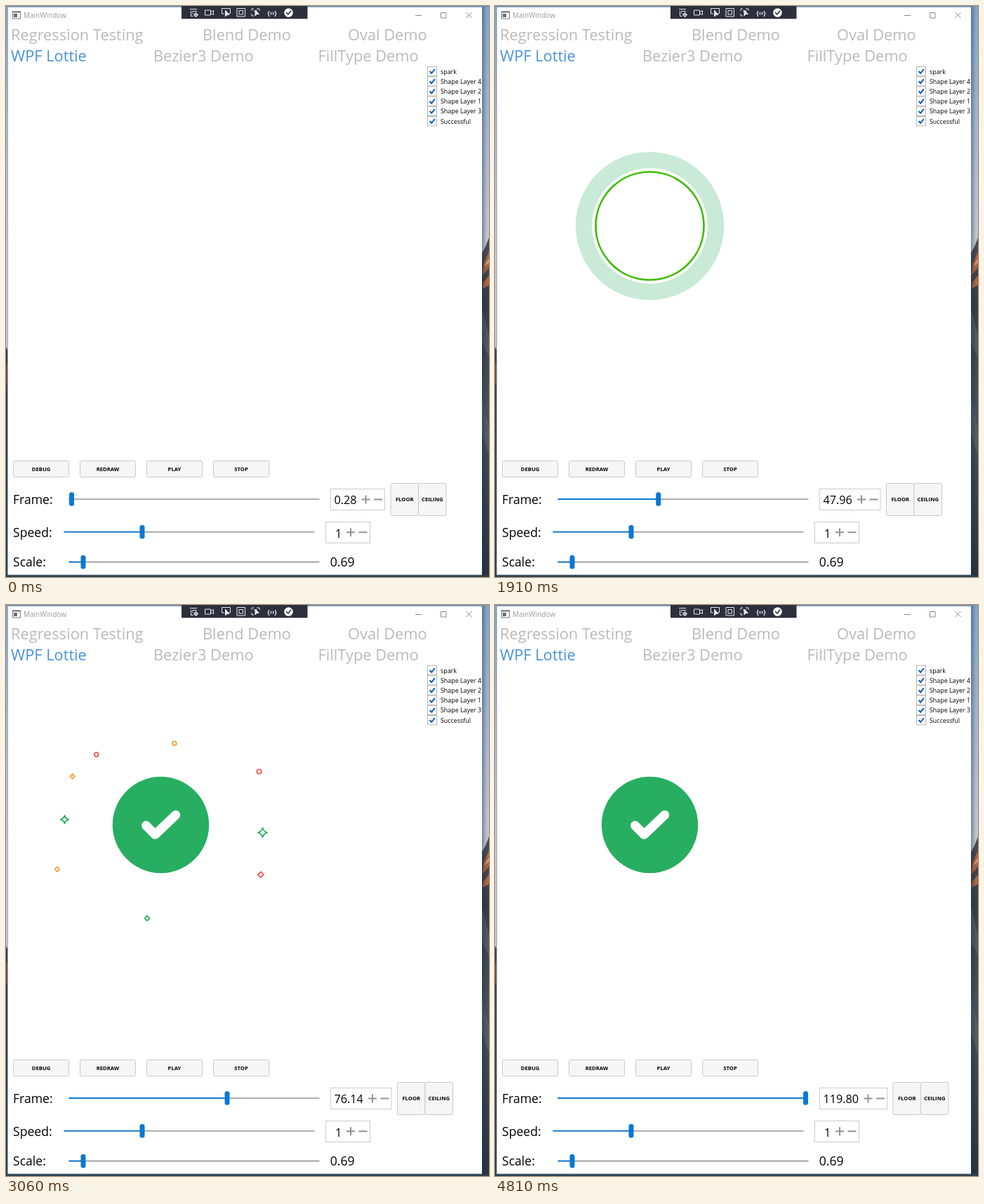
Animation of 688 by 814 pixels, one loop 4.84 s. Source, as an HTML page:

```html
<!DOCTYPE html>
<html lang="en">
<head>
<meta charset="utf-8">
<title>MainWindow</title>
<style>
html, body { margin: 0; width: 100%; height: 100%; overflow: hidden; background: #fff; }
svg { display: block; width: 688px; height: 814px; font-family: "Open Sans", "Noto Sans", sans-serif; }
.tab { font-size: 21.8px; fill: #bababa; }
.on { fill: #4792d8; }
.label { font-size: 17.6px; }
.num { font-size: 16.2px; }
.small { font-size: 8.9px; }
.btn { font-size: 7.7px; font-weight: 700; text-anchor: middle; }
.line { fill: none; stroke-linecap: round; stroke-linejoin: round; }
</style>
</head>
<body>
<svg id="stage" viewBox="0 0 688 814">
  <defs>
    <linearGradient id="sky" x1="0" y1="0" x2="0" y2="1">
      <stop offset="0" stop-color="#7fa6cd"/><stop offset=".2" stop-color="#a3b5cf"/>
      <stop offset=".42" stop-color="#c3c6d2"/><stop offset="1" stop-color="#c3c6d2"/>
    </linearGradient>
    <linearGradient id="rock" x1="0" y1="0" x2="0" y2="1">
      <stop offset="0" stop-color="#4d4b55"/><stop offset=".2" stop-color="#363c46"/>
      <stop offset=".5" stop-color="#43525c"/><stop offset="1" stop-color="#26343f"/>
    </linearGradient>
    <linearGradient id="shade">
      <stop offset="0" stop-color="#1b2c40" stop-opacity=".4"/><stop offset="1" stop-color="#1b2c40" stop-opacity="0"/>
    </linearGradient>
    <clipPath id="pane"><rect x="2" y="1" width="676" height="810"/></clipPath>
  </defs>
  <g id="desktop">
    <rect width="688" height="814" fill="url(#sky)"/>
    <path d="M688 330L683 343L678 352V814H688Z" fill="url(#rock)"/>
    <path d="M688 350L681 366L678 384L684 378L688 372ZM688 384L680 394L679 403L688 398Z" fill="#a9663f"/>
    <path d="M680 372L688 360V366Z" fill="#d39a72"/>
    <path d="M678 430L688 470V500L678 480ZM678 560L688 600V640L678 610Z" fill="#5b6870" opacity=".6"/>
    <path d="M0 486L2 490V814H0Z" fill="#38414a"/>
    <path d="M0 510H2V540H0Z" fill="#7a4b37"/>
    <rect y="811" width="688" height="3" fill="#2f414f"/>
    <rect x="678" width="7" height="814" fill="url(#shade)"/>
    <rect width="688" height="1" fill="#6f93b8"/>
  </g>
  <rect x="2" y="1" width="676" height="810" fill="#fff"/>
  <path d="M2 1.5H678M2.5 1V811M2 811H678" fill="none" stroke="#7c95ad" stroke-width=".8"/>
  <g id="chrome"></g>
  <g id="art">
    <circle id="ring" fill="none" stroke="#27ae60"/>
    <path id="arc" class="line" stroke="#3ebd00"/>
    <g id="sparks" class="line" stroke-width="2.7"></g>
    <g id="badge">
      <circle id="disc" r="68.7" fill="#27ae60"/>
      <path id="tick" class="line" d="M-21 .8L-8 13.8L21.3 -14.3" stroke="#fff" stroke-width="13"/>
    </g>
    <circle id="rim" r="77" fill="none" stroke="#3ebd00" stroke-width="2.7"/>
  </g>
  <g id="panel"></g>
</svg>
<script>
const $ = id => document.getElementById(id);
const set = (el, attrs) => { for (const k in attrs) el.setAttribute(k, attrs[k]); };
const clamp = x => Math.max(0, Math.min(1, x));
const mix = (a, b, p) => a + (b - a) * p;
const ramp = (x, a, b) => clamp((x - a) / (b - a));

// Rows are [position, value, value, ...]; returns the blended values.
function track(rows, x) {
  let i = 1;
  while (i < rows.length - 1 && x > rows[i][0]) i++;
  const a = rows[i - 1], b = rows[i], p = ramp(x, a[0], b[0]);
  return a.slice(1).map((n, k) => mix(n, b[k + 1], p));
}

const text = (x, y, cls, s, extra = "") => `<text x="${x}" y="${y}" class="${cls}" ${extra}>${s}</text>`;
const box = (x, y, w, h, fill, stroke, r = 0) =>
  `<rect x="${x}" y="${y}" width="${w}" height="${h}" rx="${r}" fill="${fill}" stroke="${stroke}"/>`;
const button = (x, y, w, h, s) => box(x, y, w, h, "#f6f6f6", "#c9c9c9", 2) +
  text(x + w / 2, y + h / 2 + 2.9, "btn", s);
const signs = (right, y) =>
  `<path d="M${right - 33.5} ${y}h12m-6 -6v12M${right - 16} ${y}h12" fill="none" stroke="#929292" stroke-width="2"/>`;
const slider = (x, y, at, id = "") => `
  <path d="M${x} ${y}h357" stroke="#969696" stroke-width="1.6"/>
  <path id="${id}fill" d="M${x} ${y}H${at}" stroke="#0a78d4" stroke-width="1.8"/>
  <rect id="${id}thumb" x="${at - 3.5}" y="${y - 9.7}" width="7" height="19.5" rx="3" fill="#0a78d4"/>`;

function buildChrome() {
  const tabs = [[7, 48.5, "Regression Testing"], [280, 48.5, "Blend Demo"], [487, 48.5, "Oval Demo"],
    [7, 78.5, "WPF Lottie"], [210, 78.5, "Bezier3 Demo"], [444.5, 78.5, "FillType Demo"]];
  const layers = ["spark", "Shape Layer 4", "Shape Layer 2", "Shape Layer 1", "Shape Layer 3", "Successful"];
  let s = text(25, 16.8, "", "MainWindow", 'font-size="10" fill="#999"');
  s += `<rect x="9.5" y="8" width="11" height="10" fill="#fff" stroke="#777"/>
    <path d="M9 8.5h12" stroke="#777" stroke-width="2"/><rect x="11" y="11" width="5" height="5" fill="#666d78"/>
    <path d="M583 13.5h9M619.5 9.5h7.5v7.5h-7.5zM655.5 9l8 8m0 -8l-8 8" fill="none" stroke="#888"/>
    <rect x="250" width="179.5" height="18.3" fill="#2c2f3c"/>
    <g fill="none" stroke="#e8e8ec">
      <path d="M262 4.5h10M263.5 7v7.5h3M265 7.5h7M265 10h2"/><circle cx="270.5" cy="12.5" r="2.4"/><path d="M270.5 9v7M267 12.5h7"/>
      <path d="M283.5 6h8v7h-8zM291.5 8.5l4 -2v6l-4 -2"/>
      <path d="M311 11h-3.5v-7.500h12v7h-2"/><path d="M312.500 6v9l2.500 -2.500h3z" fill="#e8e8ec"/>
      <path d="M329 3.500h11.500v11.500h-11.500zM332 6.500h5.500v5.500h-5.500z"/>
      <path d="M350 7v-3h3M357 4h4v3M350 11v3h3M353 7h5"/><path d="M355 6v8l2.500 -2.500h3z" fill="#e8e8ec"/>
    </g>
    <text x="379" y="13" font-size="9" font-weight="700" text-anchor="middle" fill="#f1f1f4">{‹›}</text>
    <circle cx="402.500" cy="9.500" r="6.300" fill="#fff"/>
    <path d="M399.500 9.500l2.300 2.500l4 -5" class="line" stroke="#2c2f3c" stroke-width="1.600"/>`;
  s += tabs.map(([x, y, n]) => text(x, y, n === "WPF Lottie" ? "tab on" : "tab", n)).join("");
  s += '<g clip-path="url(#pane)">' + layers.map((n, i) => {
    const y = 86.5 + 14.2 * i;
    return box(600.5, y, 13, 13.2, "#fff", "#b5b5b5") +
      `<path d="M603.500 ${y + 6.5}l2.700 3l4.600 -6" fill="none" stroke="#0b5cb8" stroke-width="2"/>` +
      text(619, y + 10, "small", n);
  }).join("") + "</g>";
  return s;
}

function buildPanel() {
  let s = ["DEBUG", "REDRAW", "PLAY", "STOP"].map((n, i) => button(10.5 + 95 * i, 648.5, 79, 23, n)).join("");
  [["Frame:", 710], ["Speed:", 757], ["Scale:", 799]].forEach(([n, y]) => s += text(10, y, "label", n));
  s += slider(89.5, 703, 93.5, "f") + slider(82.5, 749.7, 194, "s") + slider(89.5, 792.6, 110, "z");
  s += `<rect id="field" x="462.5" y="688.5" width="77" height="30" fill="#fff" stroke="#ccc"/>` +
    text(467.5, 709.5, "num", "0.28", 'id="count"');
  s += `<g id="tail">${signs(0, 703.4)}${button(8, 680.5, 39.5, 46, "FLOOR")}${button(47.5, 680.5, 39.5, 46, "CEILING")}</g>`;
  s += box(455.5, 735.5, 63, 30, "#fff", "#ccc") + text(469, 757.5, "num", "1") + signs(518.5, 750.3);
  return s + text(461.7, 799, "label", "0.69");
}

// Confetti: shape, colour, size, near point, far point.
const RED = "#f2504b", GOLD = "#f0a030", GREEN = "#27ae60";
const confetti = [
  ["circle", RED, 5, 63.5, -45.5, 145, -78],
  ["star", GREEN, 10.5, 67.5, -7, 150, 12],
  ["diamond", RED, 6.3, 55, 54, 148, 72],
  ["diamond", GOLD, 5.2, -64.5, 51.5, -153, 64],
  ["diamond", GOLD, 5.2, -61, -26.5, -130, -72],
  ["star", GREEN, 9, -59, -3, -142, -8],
  ["circle", GOLD, 4.5, 10, -57, 20, -120],
  ["circle", RED, 4.5, -40, -42, -95, -104],
  ["diamond", GREEN, 5.5, -10, 56, -20, 138]
];
function outline(kind, r) {
  if (kind === "circle") return `M${-r} 0A${r} ${r} 0 1 1 ${r} 0A${r} ${r} 0 1 1 ${-r} 0Z`;
  if (kind === "diamond") return `M0 ${-r}L${r} 0L0 ${r}L${-r} 0Z`;
  const c = r * 0.2;
  return `M0 ${-r}Q${c} ${-c} ${r} 0Q${c} ${c} 0 ${r}Q${-c} ${c} ${-r} 0Q${-c} ${-c} 0 ${-r}Z`;
}

$("chrome").innerHTML = buildChrome();
$("panel").innerHTML = buildPanel();
$("sparks").innerHTML = confetti.map(([kind, color, r]) => `<path d="${outline(kind, r)}" stroke="${color}"/>`).join("");
const bits = [...$("sparks").children];
set($("art"), { transform: "translate(220.5 313.5)" });

// The screen refreshes in runs of evenly spaced ticks: first, last, count.
const LOOP = 4840;
const ticks = [[0, 0, 1], [50, 530, 13], [580, 1060, 13], [1110, 1380, 8], [1430, 1620, 6], [1670, 1910, 7],
  [1960, 2120, 5], [2170, 2170, 1], [2200, 2580, 10], [2630, 2710, 3], [2740, 3220, 13], [3270, 3750, 13],
  [3800, 3800, 1], [3830, 4280, 12], [4330, 4810, 13]
].flatMap(([a, b, n]) => Array.from({ length: n }, (_, i) => n > 1 ? mix(a, b, i / (n - 1)) : a));

const clock = [[0, 0.28], [1380, 34.79], [1910, 47.96], [2120, 52.96], [2580, 64.29], [3800, 94.41], [4810, 119.8]];
// position, radius, stroke, start angle, end angle
const sweep = [[21, 26, 6, -30, -22], [26.6, 42, 9.5, -22, 26], [34.79, 63.5, 10.5, 85, 163],
  [40.6, 72, 7, 150, 302], [45, 77, 2.7, 160, 519.9]];

function drawArc(v) {
  const [r, w, a, b] = track(sweep, v);
  const at = deg => {
    const k = deg * Math.PI / 180;
    return `${(r * Math.cos(k)).toFixed(2)} ${(r * Math.sin(k)).toFixed(2)}`;
  };
  set($("arc"), {
    d: `M${at(a)}A${r} ${r} 0 ${b - a > 180 ? 1 : 0} 1 ${at(b)}`,
    "stroke-width": w, opacity: v >= 21 && v < 45 ? 1 : 0
  });
}

function drawArt(v) {
  drawArc(v);
  set($("rim"), { opacity: v < 45 ? 0 : 1 - ramp(v, 50.5, 58.5), r: mix(77, 68, ramp(v, 53, 59)) });

  const k = (v - 47.96) / 5;
  set($("ring"), {
    r: Math.max(0, 94 + 16.5 * k), "stroke-width": Math.max(0, 23.2 + 3.8 * k),
    opacity: v < 44.5 ? 0 : clamp(0.255 - 0.205 * k)
  });

  const [scale, turn] = track([[49, 1.135, -62], [52.96, 1.135, -36.5], [58.5, 1, 0]], v);
  set($("badge"), { transform: `rotate(${turn}) scale(${scale})` });
  set($("disc"), { opacity: ramp(v, 49.4, 58.8) });
  set($("tick"), { opacity: v > 49.4 ? 1 : 0 });

  const p = ramp(v, 58, 80), e = 1 - (1 - p) ** 2, near = 0.49;
  const size = 1 - ramp(v, 74, 80);
  set($("sparks"), { opacity: v > 58 && v < 79.9 ? 1 : 0 });
  confetti.forEach(([, , , x1, y1, x2, y2], i) => {
    const out = ramp(e, near, 1), grow = clamp(e / near);
    const x = mix(x1 * grow, x2, out), y = mix(y1 * grow, y2, out);
    set(bits[i], { transform: `translate(${x} ${y}) scale(${size})` });
  });
}

function drawPanel(v) {
  const x = 92.7 + 2.92 * v;
  const right = v < 10 ? 539.5 : v < 100 ? 549 : 558.5;
  set($("fthumb"), { x: x - 3.5 });
  set($("ffill"), { d: `M89.5 703H${x}` });
  set($("field"), { width: right - 462.5 });
  set($("tail"), { transform: `translate(${right + 0.5} 0)` });
  $("count").textContent = v.toFixed(2);
}

function draw(ms) {
  const t = ms % LOOP;
  const tick = ticks.filter(n => n <= t + 0.01).pop() || 0;
  const v = track(clock, tick)[0];
  drawArt(v);
  drawPanel(v);
}

const begin = performance.now();
function loop() {
  draw(performance.now() - begin);
  requestAnimationFrame(loop);
}
loop();
</script>
</body>
</html>
```
